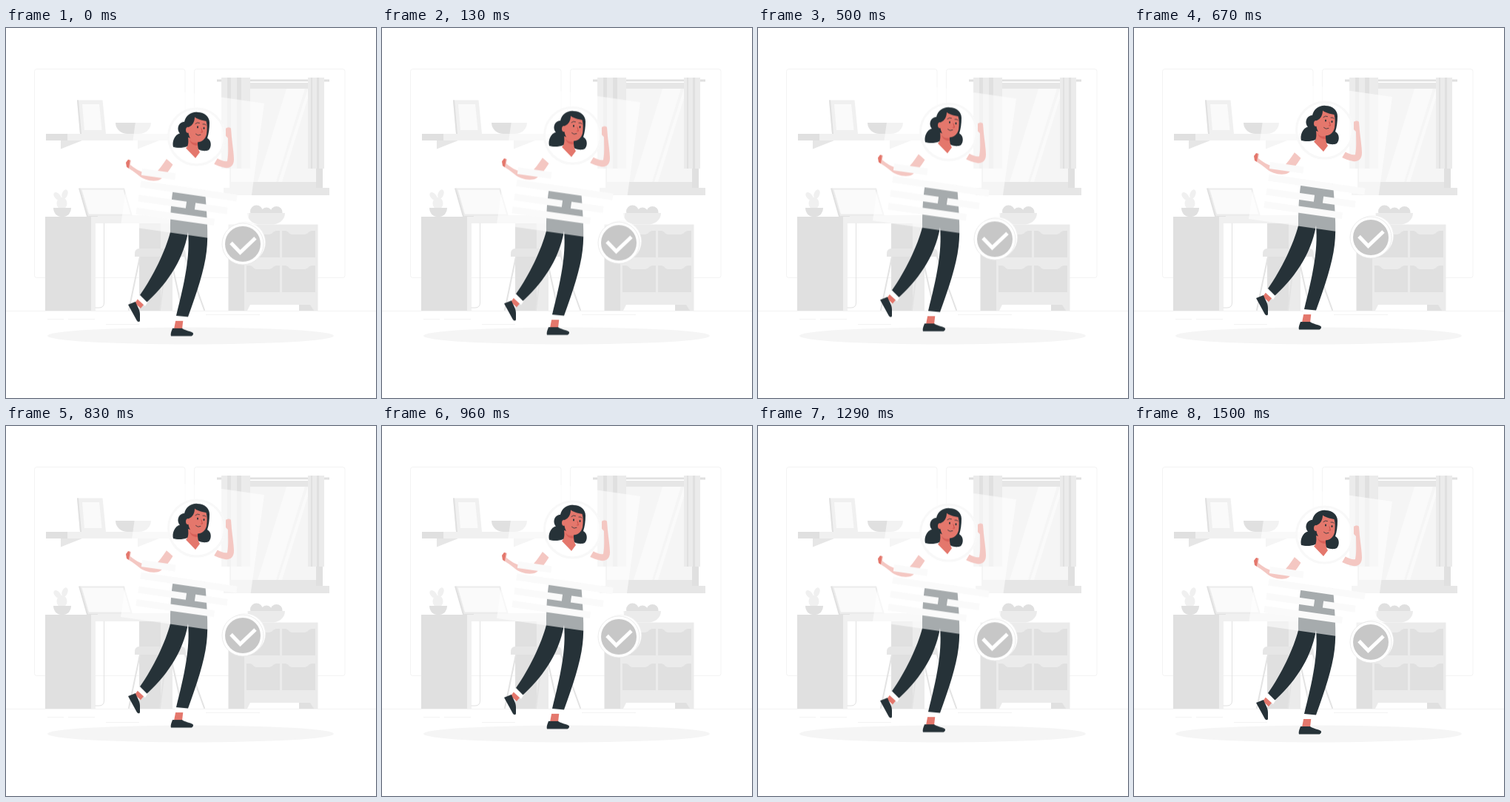
An HTML page for the animation above (1.54 s loop, 500 by 500 pixels).

```html
<!DOCTYPE html>
<html lang="en">
<head>
<meta charset="utf-8">
<title>Floating profile</title>
<style>
  html, body { margin: 0; width: 100%; height: 100%; overflow: hidden; background: #fff; }
  svg { display: block; width: 100vw; height: 100vh; }
  .g1 { fill: #e0e0e0; }
  .g2 { fill: #e6e6e6; }
  .g3 { fill: #ebebeb; }
  .g4 { fill: #f0f0f0; }
  .g5 { fill: #f5f5f5; }
  .g6 { fill: #fafafa; }
  .white { fill: #fff; }
  .dark { fill: #263238; }
  .skin { fill: #e4776c; }
  .line { fill: none; stroke-linecap: round; stroke-linejoin: round; }
  .float { animation: float 1540ms linear infinite; }
  @keyframes float {
    0%, 97.403%, 100% { transform: translateY(0); }
    48.701% { transform: translateY(-10px); }
  }
</style>
</head>
<body>
<svg viewBox="0 0 500 500">
  <defs>
    <path id="drawer" class="g1" d="M0 0H4C9 0 9 5 14 5H30C35 5 36 0 41 0H45V36H0Z"/>
  </defs>

  <!-- walls and floor -->
  <g fill="none" stroke="#f3f3f3">
    <rect x="38.5" y="55.5" width="203.5" height="282" rx="3"/>
    <rect x="254.5" y="55.5" width="203.5" height="282" rx="3"/>
    <path d="M0 382.5H500M270 387.5H343M56 393.5H78M84 393.5H120M135 400.5H180"/>
  </g>
  <ellipse class="g5" cx="249.5" cy="416" rx="193.5" ry="11.5"/>

  <!-- window -->
  <path class="g2" d="M302 73H428V216H437V226H294V216H302Z"/>
  <path class="g5" d="M304 82H419V208H304Z"/>
  <path class="g6" d="M379 82H404L365 208H340ZM408 82H412L373 208H368Z"/>
  <path class="g1" d="M419 82H428V216H419ZM285 69.5H437V72.5H285Z"/>
  <path class="white" d="M330 72.5H408V74H330Z"/>
  <path class="g3" d="M291 67H330V190H291ZM408 67H430V190H408Z"/>
  <path class="g1" d="M299 67H304V190H299ZM312 67H318V190H312ZM412 67H414V190H412ZM420 67H423V190H420Z"/>

  <!-- shelf -->
  <path class="g4" d="M96 97.5H130.500L135 143H100Z"/>
  <path class="g1" d="M96 97.5H98L102 143H100Z"/>
  <path class="g6" d="M103 103H126L129.500 138H106Z"/>
  <path class="g1" d="M148 128H196C196 137 188 143 180 143H164C156 143 148 137 148 128Z"/>
  <path class="g4" d="M83 143H228V152H83Z"/>
  <path class="g1" d="M54 143H83V152H54Z"/>
  <path class="g2" d="M74 152H103L74 163.500ZM178 152H207L178 163.500Z"/>

  <!-- desk and chair -->
  <path class="g1" d="M180 264H209V382H180Z"/>
  <path class="g3" d="M209 264H225V382H209Z"/>
  <path class="g4" d="M115 253H228V264H121V382H115Z"/>
  <path class="g1" d="M53 255H115V382H53Z"/>
  <path class="line" stroke="#e0e0e0" d="M132.500 264V371Q132.500 378 126 378H121"/>
  <path class="g1" d="M98 216.500H101L112 252H124V255H109Z"/>
  <path class="g3" d="M100 216.500H160L171 254H111Z"/>
  <path class="g6" d="M102.500 218.500H158.500L168 251.500H112Z"/>
  <g class="g4">
    <ellipse cx="75.500" cy="237" rx="7" ry="8"/>
    <ellipse cx="69.500" cy="227.500" rx="3.800" ry="6.500" transform="rotate(-42 69.500 227.500)"/>
    <ellipse cx="79.500" cy="224.500" rx="3.800" ry="6.500" transform="rotate(20 79.500 224.500)"/>
  </g>
  <path class="g1" d="M64 243H88C88 250 83 255 78 255H74C69 255 64 250 64 243Z"/>
  <path class="line" stroke="#e3e3e3" stroke-width="2" d="M181 309L166 381M217 309L208 381M222 309L238 381M242 309L268 381"/>
  <path class="g2" d="M180 298H238Q243 298 243 309H174Q173 298 180 298Z"/>

  <!-- sideboard -->
  <path class="g3" d="M322 265.500H421.500V382H322Z"/>
  <path class="g1" d="M300.500 265.500H322V382H300.500ZM396 374H411L416 382H396Z"/>
  <path class="white" d="M330 374H396V382H326Z"/>
  <use href="#drawer" x="325" y="274"/>
  <use href="#drawer" x="373" y="274"/>
  <use href="#drawer" x="325" y="321"/>
  <use href="#drawer" x="373" y="321"/>
  <g class="g1">
    <circle cx="338.500" cy="248" r="8.500"/>
    <circle cx="352" cy="250" r="7.500"/>
    <circle cx="365.500" cy="249" r="8"/>
  </g>
  <path class="g3" d="M326 250H377C377 259 369 265.500 360 265.500H343C334 265.500 326 259 326 250Z"/>

  <g class="float">
    <!-- legs -->
    <path class="skin" d="M179 365L187 373L182 379L174 372ZM229.500 394H239.500L238 407H227Z"/>
    <path class="dark" d="M165 374L175 370C177 376 181 380 181 387V396C180 398 178 397.500 176.500 395Z"/>
    <path class="dark" d="M225 406H238C243 409.500 249 409.500 252.500 412C254 414 252 416.500 250 416.500H223C222 413 224 409 225 406Z"/>
    <path class="white" d="M182 360L192 370L188 376L177 366ZM229 389H247L245 396H229Z"/>
    <path class="dark" d="M226 217C222 240 222 262 222 276C216 300 199 336 181 361L190.500 370.500C213 350 239 318 246 276C249 310 241 345 230 389L246 390.500C258 357 268 328 271 302C274 280 271 248 269 219Z"/>

    <!-- arms and shirt -->
    <path class="skin" d="M165 178L169 179L168 185C176 192 186 197 200 198C207 192 212 184 217 177L226 184C219 195 213 203 206 206C196 208 186 205 180 200C174 195 168 191 163 188L162 182Z"/>
    <path class="skin" d="M297 136C299 134 303 134 304 136L305 148C306 158 308 170 308 178C308 187 302 190 296 189C290 188 285 186 279 183L285 176C290 179 296 181 299 180C301 170 300 160 300 149L297 146Z"/>
    <path class="white" d="M230 165L244 162L256 176L262 166C273 166 281 170 286 176L280 186L272 183C271 195 268 206 271 219L228 217C231 205 230 198 229 188L217 177C221 173 225 167 230 165Z"/>
    <path class="line" stroke="#263238" d="M247 218.500H249M261 219.500H264"/>

    <!-- card -->
    <path class="white" opacity=".59" d="M182 78L349 102L323 291L155 267Z"/>
    <path class="line" stroke="#fafafa" stroke-width="9" style="stroke-linecap: butt"
      d="M183.500 194.500L229 201M182 211L312 230M179 230L243.500 239.200M255.500 241L299 247.200M176 247.500L281.500 262.500"/>
    <circle cx="257.500" cy="147" r="38" fill="#fff" fill-opacity=".6" stroke="#f8f8f8" stroke-width="3"/>

    <!-- head -->
    <path class="dark" d="M241 127C243 118 251 113 259 114C268 114 275 120 275 128C275 136 274 143 272 149C278 152 278 161 274 165C268 168 258 165 256 160L245 160C238 163 230 162 226 161C224 154 228 144 235 142.500C230 137 233 127 241 127Z"/>
    <path class="skin" d="M246 148C247 156 246 160 243 162.500L256 176L262 168C259 163 259 159 259 152Z"/>
    <path fill="#d65f58" d="M248 151C251 156 255 156 259 155V159C253 159 249 156 248 151Z"/>
    <path class="skin" d="M247 134C245 143 248 151 255 154C262 156 269 152 271 144C272 137 272 131 270.500 126C264 125 258 123 255 120.500C255 127 252 132 247 134Z"/>
    <ellipse class="skin" cx="246" cy="138" rx="3" ry="4"/>
    <ellipse class="dark" cx="259" cy="134" rx="1" ry="1.600"/>
    <ellipse class="dark" cx="267.500" cy="135.500" rx="1" ry="1.600"/>
    <path class="line" stroke="#263238" stroke-width=".8" d="M256 129.500Q258.500 127 261.500 128.500M266 130Q268.500 129.500 270 131M256.500 143.500Q259 146.500 263 144.500"/>
    <path class="line" stroke="#c94a45" stroke-width=".9" d="M264 136L265.500 141H263.500"/>

    <!-- badge -->
    <circle cx="323" cy="290" r="27.500" fill="#fff" stroke="#f0f0f0" stroke-width=".6"/>
    <circle cx="320" cy="292" r="28" fill="#fff" stroke="#e6e6e6" stroke-width=".8"/>
    <circle cx="320" cy="292" r="24" fill="#c7c7c7"/>
    <path class="line" stroke="#fff" stroke-width="5" style="stroke-linecap: butt; stroke-linejoin: miter" d="M304 290.500L316.500 303.500L337 284"/>
  </g>
</svg>
</body>
</html>
```
